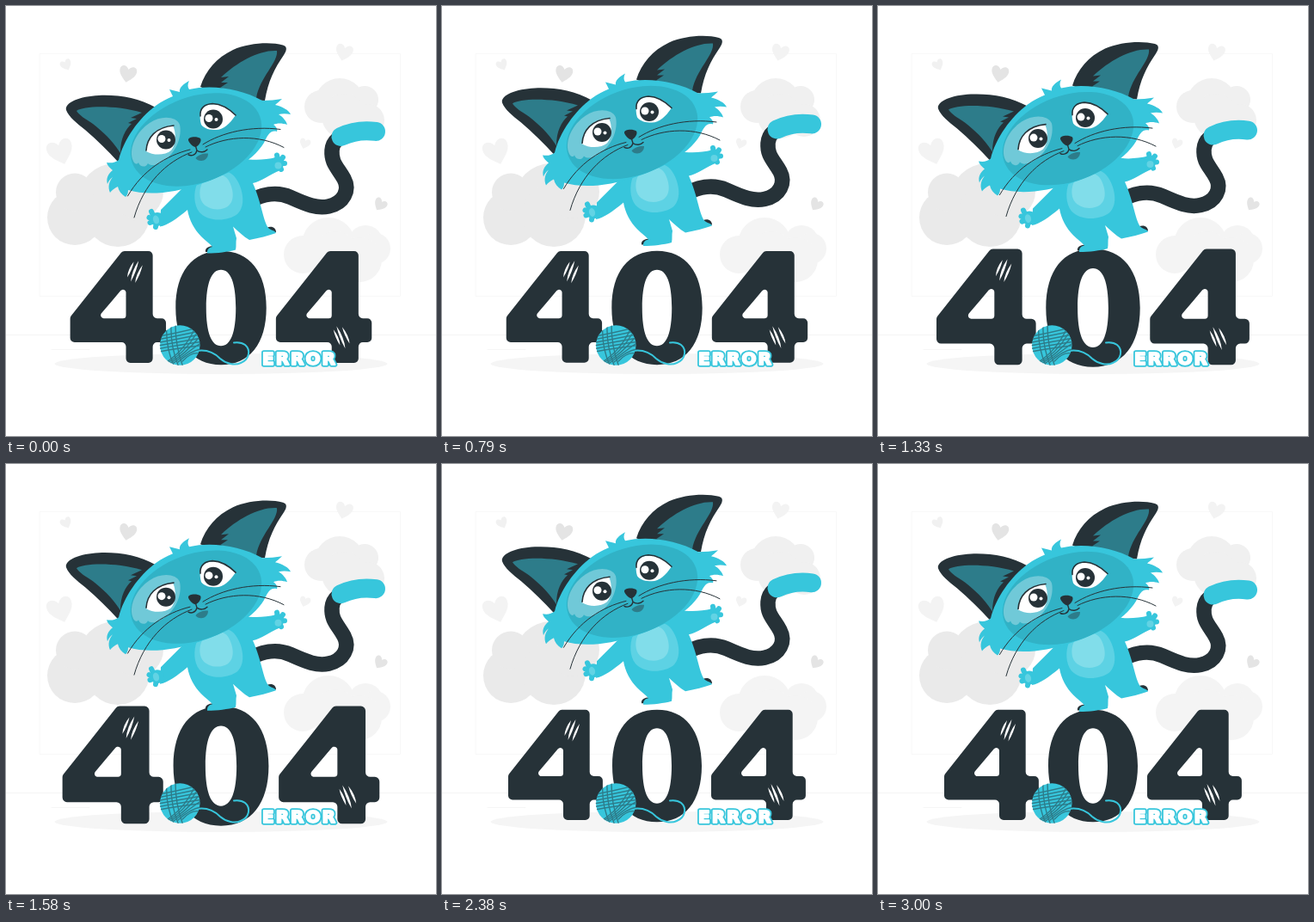
An HTML page with a canvas for the animation above (3040 ms loop, 500x500 px).

```html
<!DOCTYPE html>
<html lang="en">
<head>
<meta charset="utf-8">
<title>404 error</title>
<style>
html, body { margin: 0; width: 100%; height: 100%; overflow: hidden; background: #fff; }
canvas { display: block; width: 100%; height: 100%; }
</style>
</head>
<body>
<canvas id="stage"></canvas>
<script>
const SIZE = 500, LOOP = 3040, STEPS = 73, CYCLE = 3000;
const INK = '#263238', CYAN = '#37c6dc', MASK = '#31b2c6', TEAL = '#2d7c8a';

const canvas = document.getElementById('stage');
const ctx = canvas.getContext('2d');
const dpr = Math.max(1, window.devicePixelRatio || 1);
canvas.width = canvas.height = SIZE * dpr;

function fill(d, color) {
  ctx.fillStyle = color;
  ctx.fill(new Path2D(d), 'evenodd');
}

function line(d, color, width) {
  ctx.strokeStyle = color;
  ctx.lineWidth = width;
  ctx.lineCap = ctx.lineJoin = 'round';
  ctx.stroke(new Path2D(d));
}

function oval(x, y, rx, ry, color, deg = 0) {
  ctx.fillStyle = color;
  ctx.beginPath();
  ctx.ellipse(x, y, rx, ry, deg * Math.PI / 180, 0, Math.PI * 2);
  ctx.fill();
}

const dot = (x, y, r, color) => oval(x, y, r, r, color);

function cloud(color, puffs) {
  for (const [x, y, r] of puffs) dot(x, y, r, color);
}

function heart(x, y, size, deg, color) {
  ctx.save();
  ctx.translate(x, y);
  ctx.rotate(deg * Math.PI / 180);
  ctx.scale(size / 20, size / 20);
  fill('M0 10 C-4 6 -10 2 -10 -4 C-10 -10 -3 -11 0 -5 C3 -11 10 -10 10 -4 C10 2 4 6 0 10Z', color);
  ctx.restore();
}

// Adds a closed polygon with rounded corners to the current path.
function roundPoly(points, r) {
  const n = points.length, last = points[n - 1];
  ctx.moveTo((last[0] + points[0][0]) / 2, (last[1] + points[0][1]) / 2);
  points.forEach(([x, y], i) => ctx.arcTo(x, y, ...points[(i + 1) % n], r));
  ctx.closePath();
}

function four(dx) {
  ctx.save();
  ctx.translate(dx, 0);
  ctx.fillStyle = INK;
  ctx.beginPath();
  roundPoly([[137, 285.8], [171.7, 285.8], [171.7, 363], [186.9, 363], [186.9, 390.5], [171.7, 390.5],
    [171.7, 414], [141, 414], [141, 390.5], [77, 390.5], [77, 361.5]], 5);
  roundPoly([[141, 324], [141, 363], [108, 363]], 3.5);
  ctx.fill('evenodd');
  ctx.restore();
}

function zero() {
  const ring = (rx, ry, k) => {
    const l = 250 - rx, r = 250 + rx, t = 351 - ry, b = 351 + ry;
    const ax = rx * k, ay = ry * k;
    return `M250 ${t}C${250 + ax} ${t} ${r} ${351 - ay} ${r} 351C${r} ${351 + ay} ${250 + ax} ${b} 250 ${b}` +
      `C${250 - ax} ${b} ${l} ${351 + ay} ${l} 351C${l} ${351 - ay} ${250 - ax} ${t} 250 ${t}Z`;
  };
  fill(ring(52, 65.3, 0.63) + ring(17, 43.7, 0.65), INK);
}

function scratch(x1, y1, x2, y2, bow) {
  const mx = (x1 + x2) / 2, my = (y1 + y2) / 2;
  fill(`M${x1} ${y1}Q${mx + bow} ${my} ${x2} ${y2}Q${mx - bow * 0.6} ${my} ${x1} ${y1}Z`, '#fff');
}

function digits(scale) {
  ctx.save();
  ctx.translate(250, 350);
  ctx.scale(scale, scale);
  ctx.translate(-250, -350);
  four(0);
  zero();
  four(236);
  scratch(150, 298, 142.5, 316, -3.4);
  scratch(155.5, 297, 146.5, 321, -3.8);
  scratch(160, 302, 151.5, 322.5, -3.4);
  scratch(379, 376, 386.5, 394, 3.4);
  scratch(382.5, 372, 392.5, 397.5, 3.8);
  scratch(389, 373, 397.5, 392, 3.4);
  ctx.restore();
}

function backdrop() {
  ctx.strokeStyle = '#f8f8f8';
  ctx.lineWidth = 1;
  ctx.strokeRect(39.5, 55.5, 419, 282);
  line('M0 382.5H500', '#f4f4f4', 1);
  line('M53 399.5H97', '#f6f6f6', 1);

  cloud('#eaeaea', [[80, 246, 32], [80, 216.5, 22], [127, 226, 43], [130, 243, 37], [152, 216, 31]]);
  cloud('#f0f0f0', [[366, 117, 19], [388, 113, 29], [417, 109, 16], [421, 133, 19], [393, 128, 26]]);
  cloud('#f4f4f4', [[345, 289, 22], [375, 277, 31], [418, 275, 20], [429, 282, 18], [411, 295, 26], [383, 288, 26]]);

  heart(70, 68.5, 13, -25, '#f1f1f1');
  heart(141.5, 79, 20, 12, '#e4e4e4');
  heart(63.5, 169.5, 30, -18, '#f3f3f3');
  heart(393, 54, 20, 14, '#f3f3f3');
  heart(347.5, 160, 12.5, 18, '#f3f3f3');
  heart(435, 231, 15, 32, '#e4e4e4');

  oval(250, 416, 193.5, 12, '#f5f5f5');
}

function yarn() {
  line('M222 401C235 399 243 404 249 410C256 416 266 418.5 273 415C283 411 285 400 278 394C274 391 269 391 265 391.5', CYAN, 2);
  dot(202.3, 394.5, 23.2, CYAN);
  ctx.save();
  ctx.beginPath();
  ctx.arc(202.3, 394.5, 23.5, 0, Math.PI * 2);
  ctx.clip();
  for (let i = 0; i < 6; i++) {
    const k = i * 3.6;
    line(`M178 ${384 + k}Q200 ${380 + k} 228 ${373 + k * 1.2}`, TEAL, 1.5);
    line(`M${180 + k * 1.4} ${418 - i}Q${206 + k * 0.6} ${404 - k * 0.2} ${219 + k * 0.5} ${376 + k * 1.6}`, TEAL, 1.4);
  }
  for (let i = 0; i < 3; i++) {
    line(`M${187 + i * 5} 371Q${185 + i * 6} 396 ${196 + i * 5} 420`, TEAL, 1.4);
  }
  ctx.restore();
}

function label() {
  ctx.font = 'bold 20px "DejaVu Sans", sans-serif';
  ctx.letterSpacing = '2px';
  ctx.lineJoin = 'round';
  ctx.strokeStyle = CYAN;
  ctx.lineWidth = 5.6;
  ctx.strokeText('ERROR', 298, 416.8);
  ctx.strokeStyle = ctx.fillStyle = '#fff';
  ctx.lineWidth = 2;
  ctx.strokeText('ERROR', 298, 416.8);
  ctx.fillText('ERROR', 298, 416.8);
}

function tail() {
  line('M283 227C300 218 315 215.5 331 222.5C350 231 362 236 375 233C393 229 400 214 393 201C386 188 378 183 379 168C380 156 388 152 400 148', INK, 17.5);
  line('M389.5 152C402 146 415 144 430 146', CYAN, 22);
}

function ears() {
  fill('M70 121C68 112 86 105 108 104C131 103 154 107 174 118L160 160L131 182C118 168 106 156 92 144C82 136 73 129 70 121Z', INK);
  fill('M82 122C90 116 128 115 158 124L145 130L152 131L142 136L146 137C139 143 133 154 133 171C121 153 113 147 101 137C92 131 85 127 82 122Z', TEAL);
  fill('M226 94C232 75 245 60 264 51C282 43 307 41.5 322 45.5C327 47 327 51 323 57C312 73 305 87 301 110L260 108Z', INK);
  fill('M315 52C294 51 269 65 250 83L259 82L250 89L258 89L249 95L291 107C295 83 317 65 315 52Z', TEAL);
}

function hands() {
  for (const [x, y, tx, ty] of [[173, 248, 169, 239], [173, 249, 166.5, 246], [173, 250, 167.5, 252], [175, 251, 174, 257]]) {
    line(`M${x} ${y}L${tx} ${ty}`, CYAN, 6);
  }
  oval(176, 248, 8, 8, CYAN);
  oval(174.5, 248.5, 3.5, 5, '#62d3e4', -15);
  for (const [tx, ty] of [[315, 173.5], [322, 176], [324, 183], [320, 190]]) {
    line(`M317 183L${tx} ${ty}`, CYAN, 6);
  }
  oval(316, 183, 7, 8, CYAN);
  oval(316.5, 185.5, 4, 4, '#62d3e4');
}

function body() {
  fill('M232 286C231 282 235 279 242 279L245 286Z', INK);
  fill('M303 258C309 255 314 258 314 263L303 264Z', INK);
  fill('M212 205L180 237L179 256.5C188 255 199 247 211 237C213 249 219 260 227 268C232 273 237 276 240 280' +
    'C235 281 234 284 234 287.5C246 287.5 258 286 267 283.5C268 279 267 275 268 270L264 256.5C270 262 276 268 283 272' +
    'C294 270 305 267 314 264C313 261 308 261 305 258C298 247 298 231 287 206C297 204 306 196 319 191' +
    'L314 176C301 179 288 180 274 177Z', CYAN);
  hands();
  fill('M222 207C229 190 258 186 267 200C275 211 280 232 269 242C257 251 235 251 225 240C218 231 218 217 222 207Z', '#5dd2e4');
  fill('M228 206C234 193 253 192 259 203C264 212 267 226 258 233C249 239 234 237 228 228C224 221 225 212 228 206Z', '#81ddea');
}

function head() {
  fill('M131 179C137 155 154 131 174 116C181 111 187 108 194 105L190 97L202 100C201 95 206 91 213 87C211 91 211 94 213 97' +
    'C239 91 273 96 298 110C306 110 314 109 321 108C318 111 315 113 313 115C321 117 329 121 331 126C326 125 321 125 317 126' +
    'C322 129 326 134 327 138C321 136 315 136 311 138C315 141 316 144 315 146C307 144 304 151 300 159' +
    'C286 182 254 198 223 208C197 217 165 221 142 214C142 218 141 220 139 222C134 219 131 215 130 210C126 212 123 214 121 217' +
    'C118 210 120 204 124 199C121 201 119 204 118 207C116 200 119 195 124 191C121 188 118 186 117 182C123 183 127 182 131 179Z', CYAN);
  oval(221, 155.5, 79, 50, MASK, -20);
  fill('M202 138C198 128 180 127 167 136C152 146 143 164 147 178C149 184 152 185 154 182C156 188 163 188 165 183' +
    'C170 188 180 183 187 177C198 169 205 151 202 138Z', '#70c9d8');
}

function eye(x, y) {
  dot(x, y, 11, INK);
  dot(x - 5, y - 1, 4.5, '#fff');
  dot(x + 3.5, y + 0.5, 2, '#fff');
}

function face() {
  fill('M163 169C164 153 174 141 194 139C198 147 198 161 192 168C185 174 171 174 163 169Z', '#fff');
  fill('M227 138C224 128 226 117 235 115C248 112 259 118 267 127C260 137 253 144 244 144C237 144 231 143 227 138Z', '#fff');
  eye(186, 155.5);
  eye(241, 131.5);
  line('M163 168C164 153 174 141 195 139', INK, 1.6);
  line('M226 128C225 118 232 114 240 113.5C251 114 260 120 267 127', INK, 1.6);

  fill('M212 156C211 152 222 151 226 154C228 157 224 163 220 164C216 163 213 159 212 156Z', INK);
  line('M220.5 163L222 168C221 173 216 175 212 173M222 168C226 171 231 170 234 167', INK, 1.4);
  fill('M220.5 177C223 173 230 171 235 171.5C235 177 231 180 227 180C224 180 222 179 220.5 177Z', TEAL);
  line('M214 167C186 174 159 191 141.5 221M216 170C186 181 160 207 149 246', INK, 1);
  line('M229 161C251 147 285 139 319 143.5M232 164C258 151 294 149 323 164.5', INK, 1);
}

function cat(lift) {
  ctx.save();
  ctx.translate(0, 0.5 - lift);
  tail();
  ears();
  body();
  head();
  face();
  ctx.restore();
}

// Two beats per cycle: slow fall after the first, quick fall after the second.
function beat(p) {
  const keys = [[0, 0], [0.1, 1], [0.3, 0], [0.4, 0], [0.5, 1], [0.6, 0], [1, 0]];
  const i = Math.max(1, keys.findIndex(k => p <= k[0]));
  const [a, u] = keys[i - 1], [b, v] = keys[i];
  return 1 + 0.1 * (u + (v - u) * (p - a) / (b - a));
}

function draw(ms) {
  const step = Math.min(STEPS - 1, Math.floor((ms % LOOP + 5) * 24 / 1000));
  const p = (step + 1) / STEPS;
  const bob = (p * CYCLE % 1500) / 1500;
  ctx.setTransform(dpr, 0, 0, dpr, 0, 0);
  ctx.fillStyle = '#fff';
  ctx.fillRect(0, 0, SIZE, SIZE);
  backdrop();
  digits(beat(p));
  yarn();
  label();
  cat(10 * (1 - Math.abs(1 - 2 * bob)));
}

let start;
function tick(now) {
  if (start === undefined) start = now;
  draw(now - start);
  requestAnimationFrame(tick);
}
draw(0);
requestAnimationFrame(tick);
</script>
</body>
</html>
```
